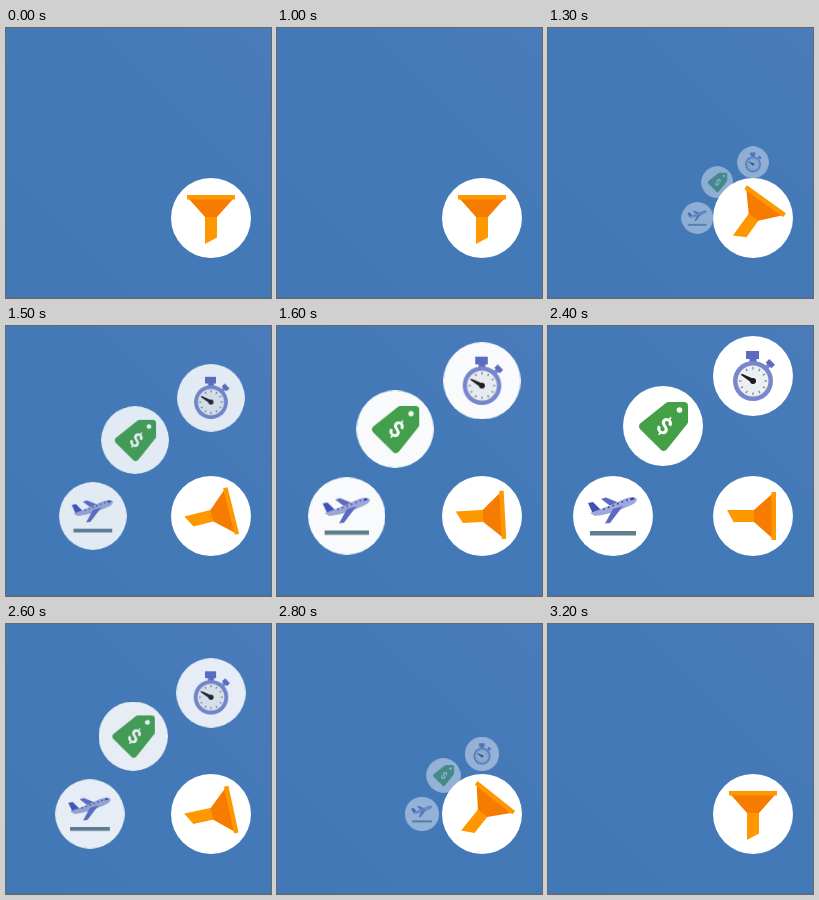
An HTML page with a canvas for the animation above (3300 ms loop, 265 by 270 pixels).

```html
<!DOCTYPE html>
<html lang="en">
<head>
<meta charset="utf-8">
<title>Filter menu</title>
<style>
html, body { margin: 0; width: 100%; height: 100%; overflow: hidden; background: #4479b7; }
canvas { display: block; }
</style>
</head>
<body>
<canvas id="stage" width="265" height="270"></canvas>
<script>
const W = 265, H = 270, LOOP = 3300, STEP = 100;
const HUB = { x: 205, y: 190 }, R = 40;
const ctx = document.getElementById('stage').getContext('2d');
ctx.imageSmoothingQuality = 'high';

function poly(c, color, ...pts) {
  c.fillStyle = color;
  c.beginPath();
  for (let i = 0; i < pts.length; i += 2) c.lineTo(pts[i], pts[i + 1]);
  c.closePath();
  c.fill();
}

function disc(c, color, x, y, r) {
  c.fillStyle = color;
  c.beginPath();
  c.arc(x, y, r, 0, Math.PI * 2);
  c.fill();
}

function rect(c, color, x, y, w, h) {
  c.fillStyle = color;
  c.fillRect(x, y, w, h);
}

// Icons are drawn around the centre of their disc.
function drawWatch(c) {
  rect(c, '#5c6bc0', -3.5, -19, 7, 6);
  rect(c, '#5c6bc0', -7, -25, 13, 8);
  c.save();
  c.translate(0, 5);
  c.rotate(Math.PI / 4);
  rect(c, '#7986cb', -2, -23, 4, 5);
  rect(c, '#5c6bc0', -4, -27, 8, 5);
  c.restore();
  disc(c, '#7986cb', 0, 5, 20);
  disc(c, '#eceff1', 0, 5, 15.5);
  for (let i = 0; i < 12; i++) {
    c.save();
    c.translate(0, 5);
    c.rotate(i * Math.PI / 6);
    rect(c, '#78838c', -0.6, -14, 1.2, 2.6);
    c.restore();
  }
  poly(c, '#1c1c1c', -12, -1, -10.5, -2, 1, 3, -1, 7);
  disc(c, '#1c1c1c', 0, 5, 3);
}

function drawTag(c) {
  c.fillStyle = '#43a047';
  c.beginPath();
  c.moveTo(6, -24);
  c.arcTo(25, -24, 25, -5, 4);
  c.arcTo(25, -3, 4, 22, 3);
  c.arcTo(1, 27, -24, 2, 4);
  c.arcTo(-26, 0, 4, -24, 4);
  c.arcTo(4, -24, 10, -24, 4);
  c.closePath();
  c.fill();
  disc(c, '#fff', 16.5, -16, 2.8);
  c.save();
  c.translate(1.5, 0);
  c.rotate(0.6);
  c.font = 'bold 23px Roboto, Arial, sans-serif';
  c.textAlign = 'center';
  c.fillStyle = '#fff';
  c.fillText('$', 0, 8);
  c.restore();
}

function drawPlane(c) {
  rect(c, '#607d8b', -23, 15, 46, 4.5);
  poly(c, '#5c6bc0', -12, -17, -7, -18.5, 9, -12, 0, -8);
  poly(c, '#3f51b5', -25, -13, -20, -14, -12, -6, -20, -2);
  c.fillStyle = '#9fa8da';
  c.beginPath();
  c.moveTo(-23, -3);
  c.quadraticCurveTo(-8, -8, 11, -17);
  c.quadraticCurveTo(21, -21, 24, -17);
  c.quadraticCurveTo(24, -13, 15, -9.5);
  c.quadraticCurveTo(-4, -1, -18, 0);
  c.closePath();
  c.fill();
  poly(c, '#5c6bc0', 0, -7, 10, -10, -3, 7, -8, 7.5);
  for (let i = 0; i < 6; i++) disc(c, '#3949ab', -9 + i * 4.6, -7 - i * 1.75, 0.9);
  poly(c, '#303f9f', 17, -17.5, 20, -18.5, 22, -17, 18, -15.5);
}

function sprite(draw) {
  const cv = document.createElement('canvas');
  cv.width = cv.height = R * 2;
  const c = cv.getContext('2d');
  c.translate(R, R);
  disc(c, '#fff', 0, 0, R);
  draw(c);
  return cv;
}

const items = [
  { dx: -140, dy: 0, img: sprite(drawPlane) },
  { dx: -90, dy: -90, img: sprite(drawTag) },
  { dx: 0, dy: -140, img: sprite(drawWatch) }
];

const backdrop = ctx.createLinearGradient(0, H, W, 0);
backdrop.addColorStop(0, '#4278b5');
backdrop.addColorStop(0.6, '#4479b7');
backdrop.addColorStop(1, '#4a7bbb');

// cubic-bezier(.42, 0, .58, 1)
function easeInOut(x) {
  if (x <= 0) return 0;
  if (x >= 1) return 1;
  let lo = 0, hi = 1, u = 0.5;
  for (let i = 0; i < 24; i++) {
    u = (lo + hi) / 2;
    const v = 1 - u;
    if (3 * v * v * u * 0.42 + 3 * v * u * u * 0.58 + u ** 3 < x) lo = u;
    else hi = u;
  }
  return u * u * (3 - 2 * u);
}

const openness = t => easeInOut((t - 992) / 700) - easeInOut((t - 2421) / 700);

function drawFunnel(p) {
  disc(ctx, '#fff', HUB.x, HUB.y, R);
  ctx.save();
  ctx.translate(HUB.x, HUB.y);
  ctx.rotate(p * Math.PI / 2);
  poly(ctx, '#ff9800', -6, -4, 6, -4, 6, 19.5, -6, 26);
  poly(ctx, '#f57c00', -22, -19, 22, -19, 6, -1, -6, -1);
  rect(ctx, '#ff9800', -24, -23, 48, 4.5);
  ctx.restore();
}

function render(t) {
  const p = openness(t);
  rect(ctx, backdrop, 0, 0, W, H);
  rect(ctx, '#4d719f', 0, H - 1, W, 1);
  if (p > 0.001) {
    const size = R * 2 * p;
    ctx.globalAlpha = p;
    for (const { dx, dy, img } of items) {
      ctx.drawImage(img, HUB.x + dx * p - size / 2, HUB.y + dy * p - size / 2, size, size);
    }
    ctx.globalAlpha = 1;
  }
  drawFunnel(p);
}

// The motion is shown at ten pictures a second.
function tick() {
  const t = (performance.now() + 4) % LOOP;
  render(Math.floor(t / STEP) * STEP);
  requestAnimationFrame(tick);
}
tick();
</script>
</body>
</html>
```
